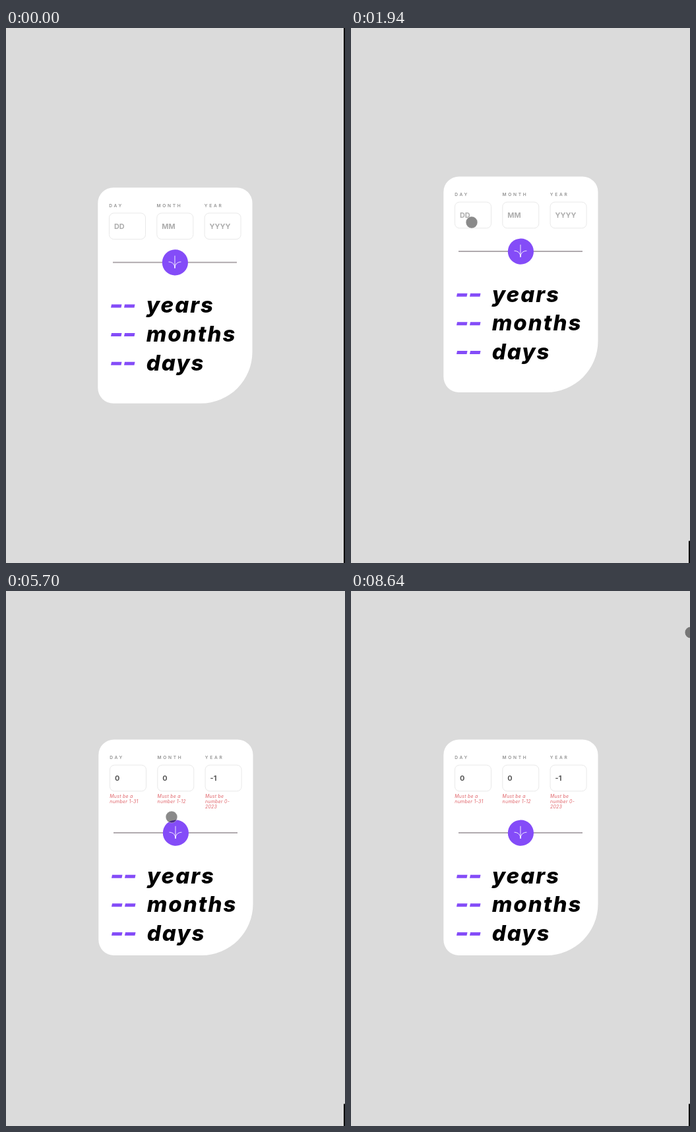
An HTML page that plays this animation: 514 px wide and 812 px high, repeating every 9.88 s.

```html
<!DOCTYPE html>
<html lang="en">
<head>
<meta charset="utf-8">
<title>Age calculator</title>
<style>
  html, body { margin: 0; width: 100%; height: 100%; overflow: hidden; background: #dbdbdb; }
  svg { display: block; width: 514px; height: 812px; }
  text { font-family: Inter, "Open Sans", sans-serif; font-feature-settings: "cv11"; white-space: pre; }
  .label { font-size: 6.6px; font-weight: 600; letter-spacing: 2.7px; fill: #929292; }
  .field { font-size: 10.9px; font-weight: 700; }
  .hint { fill: #adadad; }
  .value { fill: #585858; }
  .error { font-size: 7px; font-style: italic; letter-spacing: .25px; fill: #e0646a; }
  .unit { font-size: 33px; font-weight: 800; font-style: italic; letter-spacing: 2px; fill: #000; }
  .size { font: 300 13.6px "Open Sans", sans-serif; fill: #3c3c3c; }
</style>
</head>
<body>
<svg viewBox="0 0 514 812" xmlns="http://www.w3.org/2000/svg">
  <rect width="514" height="812" fill="#dbdbdb"/>
  <rect id="edge" x="512" width="2" height="812" fill="#000"/>
  <g id="card">
    <path fill="#fff" d="M163.7 225.4H351.1a23.4 23.4 0 0 1 23.4 23.4V475a78 78 0 0 1-78 78H163.7a23.4 23.4 0 0 1-23.4-23.4V248.8a23.4 23.4 0 0 1 23.4-23.4Z"/>
    <g id="fields"></g>
    <g id="errors"></g>
    <rect id="caret" y="275.5" width="1" height="16" fill="#666"/>
    <g id="result">
      <path d="M163 339H351" stroke="#b0aaae" stroke-width="1.8"/>
      <circle cx="257.4" cy="339.2" r="19.6" fill="#844cf8"/>
      <path transform="translate(247.1 328.8) scale(.43)" fill="none" stroke="#fff" stroke-width="2.1"
        d="M1 22C8.3 21.7 23 25.6 23 44V0M45 22C37.7 21.7 23 25.6 23 44"/>
    </g>
  </g>
  <g id="size">
    <rect x="411" width="103" height="25" fill="#f7f7f7"/>
    <text id="sizeText" class="size" x="417" y="18"></text>
  </g>
  <circle id="cursor" r="8.9" fill="#000" fill-opacity=".46" stroke="#fff" stroke-opacity=".4"/>
</svg>
<script>
const LOOP = 9880, STEP = 80, BLINK = 495;
const SCALE = .78, FULL = 1041, REST = 998;   // viewport heights in CSS pixels
const BLUR = 5370, SUBMIT = 5530;
const $ = id => document.getElementById(id);

function add(parent, tag, attrs, text) {
  const el = document.createElementNS("http://www.w3.org/2000/svg", tag);
  for (const k in attrs) el.setAttribute(k, attrs[k]);
  if (text) el.textContent = text;
  return parent.appendChild(el);
}

const show = (el, on) => el.setAttribute("visibility", on ? "visible" : "hidden");
const move = (el, x, y) => el.setAttribute("transform", `translate(${x} ${y})`);

const inputs = [
  { label: "DAY", hint: "DD", error: ["Must be a", "number 1-31"], focus: 1440, typeAt: 2580, text: "0" },
  { label: "MONTH", hint: "MM", error: ["Must be a", "number 1-12"], focus: 2910, typeAt: 3160, text: "0" },
  { label: "YEAR", hint: "YYYY", error: ["Must be", "number 0-", "2023"], focus: 3650, typeAt: 4640, text: "-1" }
];

inputs.forEach((f, i) => {
  const g = $("fields"), x = 157 + i * 72.3;
  f.textX = x + 8;
  add(g, "text", { class: "label", x: x + .2, y: 255 }, f.label);
  add(g, "rect", { x: x + .5, y: 264.2, width: 55, height: 39.6, rx: 7, fill: "#fff", stroke: "#e9e9e9" });
  f.hintText = add(g, "text", { class: "field hint", x: f.textX, y: 288 }, f.hint);
  f.valueText = add(g, "text", { class: "field value", x: f.textX, y: 288 });
  f.error.forEach((s, j) => add($("errors"), "text", { class: "error", x: x + .3, y: 314 + j * 7.9 }, s));
});

["years", "months", "days"].forEach((unit, i) => {
  const g = $("result"), y = 415.7 + i * 43.6;
  add(g, "text", { class: "unit", x: 213.7, y }, unit);
  for (const x of [160, 180])
    add(g, "path", { d: `M${x + 1} ${y - 13}h15.5l-1 5h-15.5Z`, fill: "#844cf8" });
});

// A glide runs from the previous point; equal times mean a jump.
const glides = [
  { from: 820, to: 820, x: 405, y: 175 },
  { from: 820, to: 970, x: 217, y: 311 },
  { from: 1045, to: 1210, x: 183, y: 295 },
  { from: 2580, to: 2910, x: 263, y: 288 },
  { from: 3160, to: 3480, x: 327, y: 285 },
  { from: 5210, to: 5370, x: 251, y: 343 },
  { from: 5770, to: 6320, x: -1, y: 339 },
  { from: 8230, to: 8230, x: -40, y: 339 },
  { from: 8480, to: 8480, x: 47, y: 231 },
  { from: 8480, to: 8640, x: 515, y: 63 }
];

// The pointer is sampled in steps and slows slightly towards its goal.
function progress(g, t) {
  if (t >= g.to) return 1;
  const n = Math.round((g.to - g.from) / STEP);
  const p = Math.floor((t - g.from) / (g.to - g.from) * n) / n;
  return p * (1.2 - .2 * p);
}

function drawCursor(t) {
  let x = -40, y = 0;
  for (const g of glides) {
    if (t < g.from) break;
    const p = progress(g, t);
    x += (g.x - x) * p;
    y += (g.y - y) * p;
  }
  move($("cursor"), x, y);
}

function drawView(t) {
  const height = t < 580 ? FULL : t < 650 ? 992 : REST;
  const full = height === FULL;
  move($("card"), full ? -1 : 0, (height - REST) / 2 * SCALE);
  $("edge").setAttribute("y", full ? 0 : height * SCALE);
  show($("size"), !full && t < 1440);
  $("sizeText").textContent = `659px × ${height}px`;
}

function drawFields(t) {
  let active = null;
  for (const f of inputs) {
    const count = Math.max(0, Math.floor((t - f.typeAt) / STEP) + 1);
    f.valueText.textContent = f.text.slice(0, count);
    show(f.hintText, !count);
    f.lastKey = count ? f.typeAt + (Math.min(count, f.text.length) - 1) * STEP : f.focus;
    if (t >= f.focus && t < BLUR) active = f;
  }
  show($("caret"), active && Math.floor((t - active.lastKey) / BLINK) % 2 === 0);
  if (active) $("caret").setAttribute("x", active.textX + active.valueText.getComputedTextLength() + .3);
}

function draw(t) {
  drawView(t);
  drawFields(t);
  show($("errors"), t >= SUBMIT);
  move($("result"), 0, t >= SUBMIT ? 28 : 0);
  drawCursor(t);
}

const start = performance.now();
function tick() {
  draw((performance.now() - start) % LOOP);
  requestAnimationFrame(tick);
}
draw(0);
requestAnimationFrame(tick);
</script>
</body>
</html>
```
